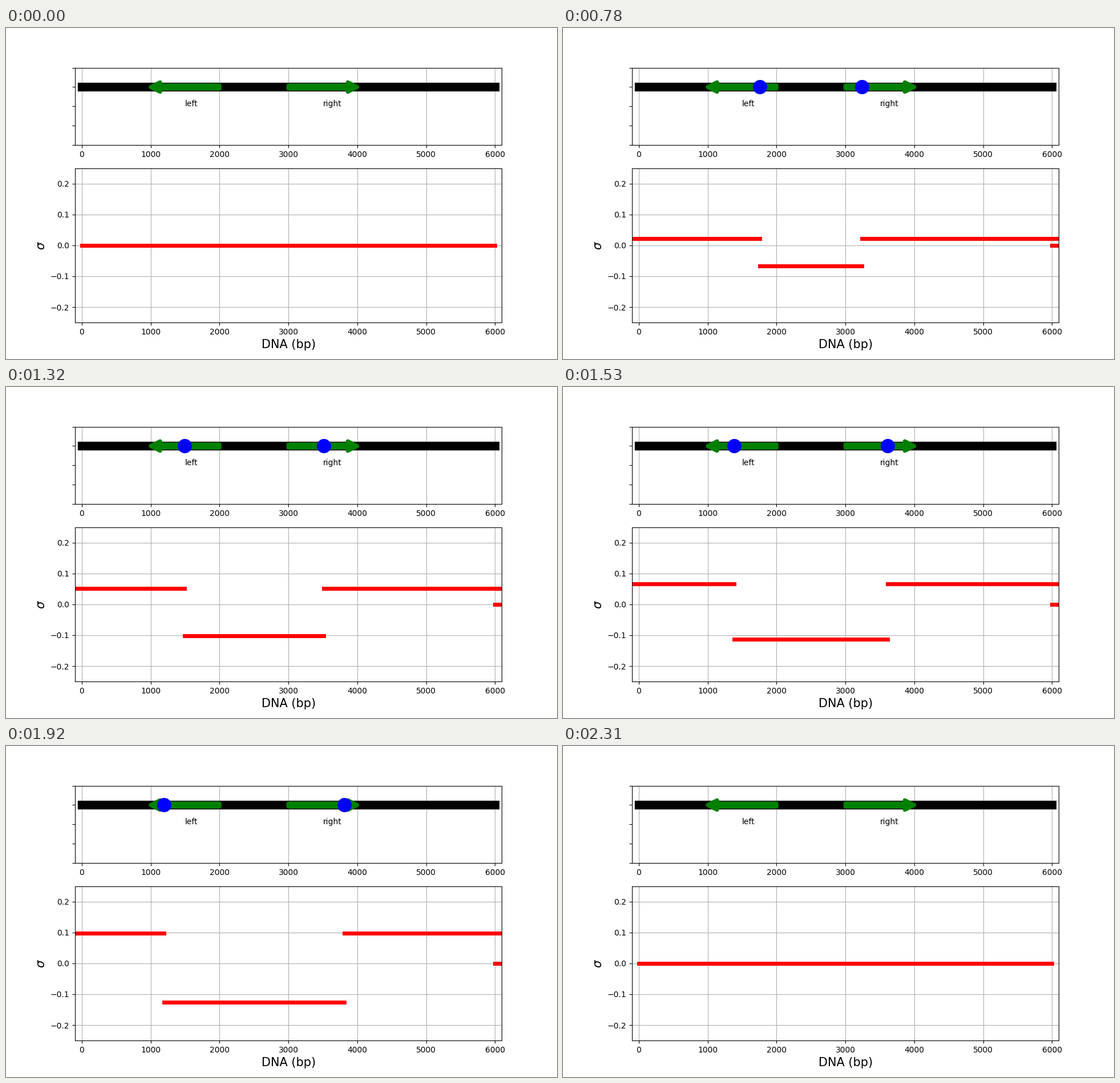
These frames come from a looping animation (966 px wide and 580 px high, 3.1 s). A matplotlib script:

```python
import matplotlib.pyplot as plt
from matplotlib.animation import FuncAnimation

TICK = 10               # ms per animation frame
LOOP = 3100             # ms
START, STEP, MOVES = 330, 30, 65
SPEED = 15              # bp per step
GENOME = 6000
LEFT, RIGHT = 2000, 3000
GAMMA, LEAD = 0.202, 7  # supercoils per transcribed bp, initial offset

fig, (top, low) = plt.subplots(
    2, 1, figsize=(9.66, 5.8), dpi=100, gridspec_kw={"height_ratios": [1, 2]})

for ax in (top, low):
    ax.set_xlim(-100, GENOME + 100)
    ax.set_xticks(range(0, GENOME + 1, 1000))

# Genome map
top.set_ylim(0, 2)
top.set_yticks([0, 0.5, 1, 1.5, 2], labels=[])
top.grid(axis="x")
top.plot([0, GENOME], [1.5, 1.5], color="black", lw=11)


def gene(name, start, end):
    top.annotate("", xy=(end, 1.5), xytext=(start, 1.5),
                 arrowprops=dict(width=4, headwidth=12, headlength=12,
                                 color="green", lw=5))
    top.text((start + end) / 2, 1, name)


gene("left", LEFT, LEFT - 1000)
gene("right", RIGHT, RIGHT + 1000)
polymerases, = top.plot([], [], "o", color="blue", ms=17, zorder=4)

# Supercoiling density
low.set_ylim(-0.25, 0.25)
low.set_yticks([-0.2, -0.1, 0, 0.1, 0.2])
low.grid()
low.set_xlabel("DNA (bp)", fontsize=15)
low.set_ylabel(r"$\sigma$", fontsize=15)
levels = [low.plot([], [], color="red", lw=5)[0] for _ in range(4)]


def show(segments):
    for i, line in enumerate(levels):
        if i < len(segments):
            x0, x1, y = segments[i]
            line.set_data([x0, x1], [y, y])
        else:
            line.set_data([], [])


def update(i):
    n = (i * TICK - START) // STEP
    if not 0 <= n <= MOVES:
        polymerases.set_data([], [])
        show([(0, GENOME, 0)])
        return
    shift = SPEED * (n + 1)
    a, b = LEFT - shift, RIGHT + shift
    polymerases.set_data([a, b], [1.5, 1.5])
    twist = GAMMA * (2 * shift + LEAD)
    inner = b - a
    outer = GENOME - inner
    show([(-200, a, twist / outer),
          (a, b, -twist / inner),
          (b, GENOME + 200, twist / outer),
          (GENOME, GENOME + 200, 0)])


anim = FuncAnimation(fig, update, frames=LOOP // TICK, interval=TICK,
                     init_func=lambda: update(0), repeat=True, repeat_delay=0)
plt.show()
```
